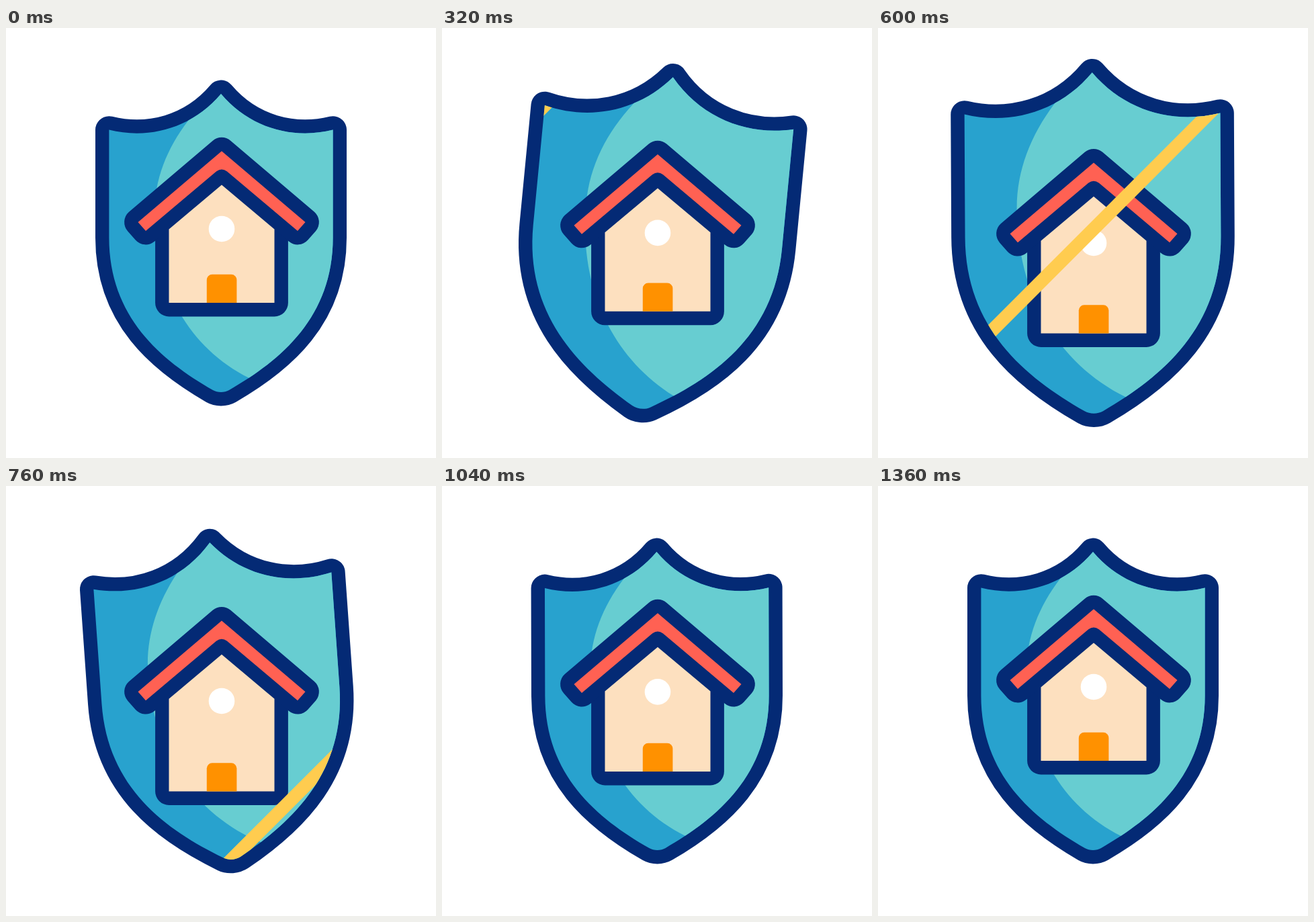
Recreate the animation shown at these times as an HTML page with a canvas. Size 640 px wide and 640 px high, loop 1440 ms.

```html
<!DOCTYPE html>
<html lang="en">
<head>
<meta charset="utf-8">
<title>Home protection</title>
<style>
  html, body { margin: 0; width: 100%; height: 100%; overflow: hidden; background: #fff; }
  canvas { display: block; width: 100vmin; height: 100vmin; }
</style>
</head>
<body>
<canvas id="stage" width="640" height="640"></canvas>
<script>
const ctx = document.getElementById('stage').getContext('2d');
const LOOP = 1440, STEP = 40, OUTLINE = 40.8;
const COLOR = {
  navy: '#042a75', blue: '#28a2ce', teal: '#67cdd1', coral: '#ff6153',
  peach: '#fde0bf', orange: '#ff9100', yellow: '#ffcc4f', white: '#fff'
};

const shieldPath = new Path2D(
  'M153.4 151.6 C212 166 276 150 320 98 C364 150 428 166 486.6 151.6 V312 ' +
  'C486.6 430 410 494 332 539 C325 543 315 543 308 539 C230 494 153.4 430 153.4 312 Z');
const lightPath = new Path2D(
  'M330 60 L271 138 C239 180 221 226 221 275 C221 385 272 476 362 521 L390 536 H520 V60 Z');
const roofPath = new Path2D(
  'M196.5 289 L321 183.2 L445.5 289 L434 302 L329 213.5 Q321 207.5 313 213.5 L208 302 Z');

// Eased progress from 0 to 1 between two times.
function ease(t, start, end) {
  const x = Math.min(1, Math.max(0, (t - start) / (end - start)));
  return x * x * (3 - 2 * x);
}

function fill(path, color) {
  ctx.fillStyle = color;
  ctx.fill(path);
}

function outline(path) {
  ctx.strokeStyle = COLOR.navy;
  ctx.lineWidth = OUTLINE;
  ctx.lineJoin = 'round';
  ctx.stroke(path);
}

function shifted(path, dy) {
  const moved = new Path2D();
  moved.addPath(path, new DOMMatrix().translate(0, dy));
  return moved;
}

// The shield swells and rocks while its outline keeps its weight.
function shieldMatrix(t) {
  const scale = 1 + 0.157 * (ease(t, 0, 480) - ease(t, 520, 950));
  const angle = 5.7 * ease(t, 0, 360) - 9.9 * ease(t, 446, 716) + 4.2 * ease(t, 720, 1080);
  return new DOMMatrix().translate(320, 320).rotate(angle).scale(scale).translate(-320, -320);
}

function placed(path, matrix) {
  const result = new Path2D();
  result.addPath(path, matrix);
  return result;
}

function drawHouse(t) {
  const stretch = ease(t, 180, 580) - ease(t, 800, 1200);
  const roofShift = 17.2 * stretch;
  const floorShift = 45.5 * stretch;
  const floor = 409 + floorShift;

  const roof = shifted(roofPath, roofShift);
  const wall = new Path2D(
    `M242.5 ${299.5 + roofShift} L321 ${233.6 + roofShift} L399.5 ${299.5 + roofShift} V${floor} H242.5 Z`);
  const door = new Path2D();
  door.roundRect(298.8, 366.8 + floorShift, 44.6, 42.2, [8, 8, 0, 0]);
  const porthole = new Path2D();
  porthole.arc(321, 299 + 21 * stretch, 19.3, 0, 2 * Math.PI);

  outline(wall);
  outline(roof);
  fill(wall, COLOR.peach);
  fill(roof, COLOR.coral);
  fill(door, COLOR.orange);
  fill(porthole, COLOR.white);
}

// A diagonal glint; x + y is constant along each edge.
function drawGlint(t) {
  const mid = 268 + 672 * ease(t, 342, 842);
  const near = mid - 14, far = mid + 14;
  fill(new Path2D(`M${near} 0 H${far} L${far - 640} 640 H${near - 640} Z`), COLOR.yellow);
}

function draw(t) {
  const matrix = shieldMatrix(t);
  const shield = placed(shieldPath, matrix);
  ctx.fillStyle = COLOR.white;
  ctx.fillRect(0, 0, 640, 640);

  outline(shield);
  fill(shield, COLOR.blue);
  ctx.save();
  ctx.clip(shield);
  fill(placed(lightPath, matrix), COLOR.teal);
  drawHouse(t);
  drawGlint(t);
  ctx.restore();
}

const begin = performance.now();
function tick() {
  const t = (performance.now() - begin) % LOOP;
  draw(Math.min(LOOP - 2 * STEP, Math.floor(t / STEP) * STEP));
  requestAnimationFrame(tick);
}
tick();
</script>
</body>
</html>
```
